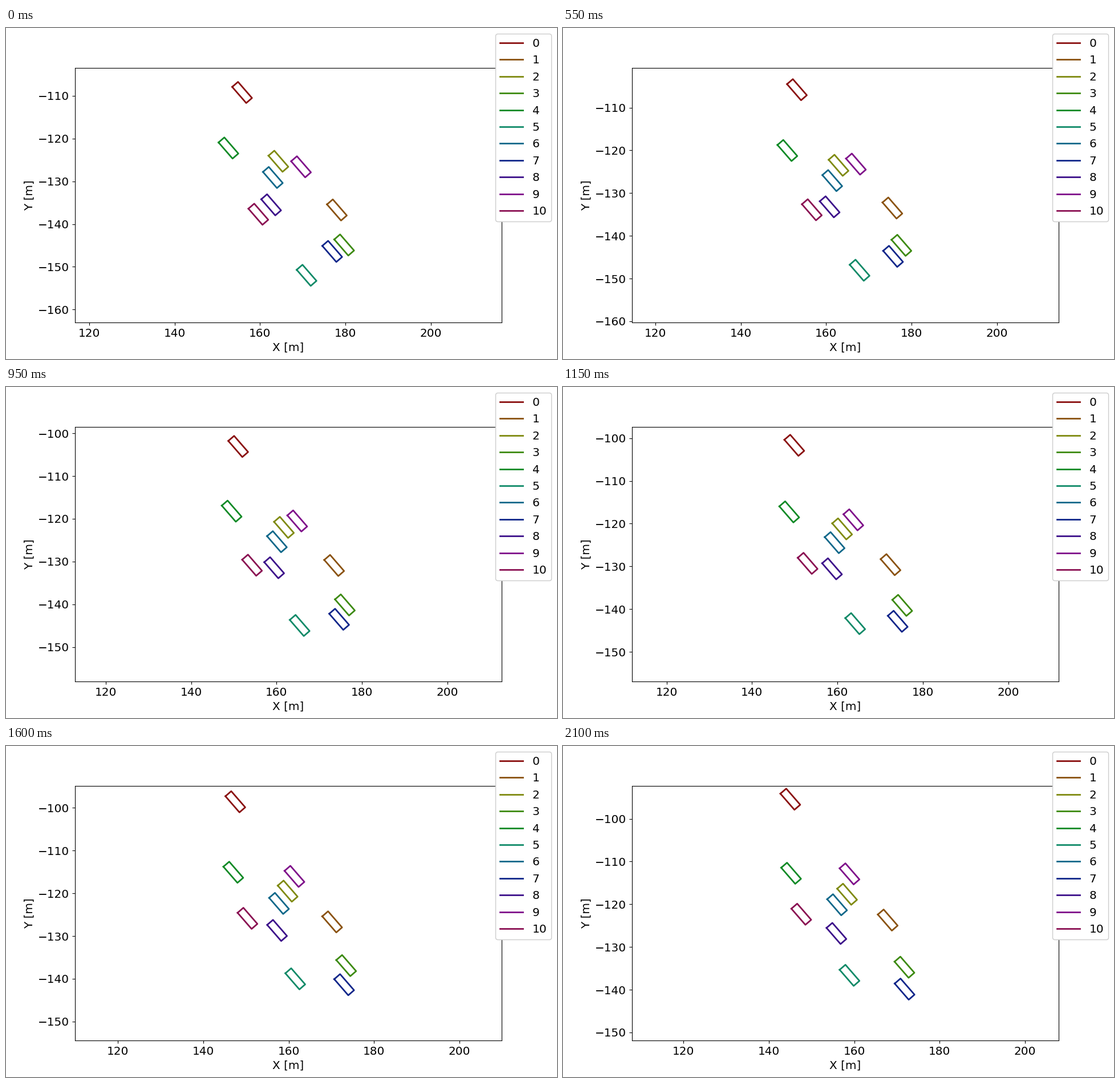
Recreate the animation shown at these times as a matplotlib script. Size 966x580 px, loop 2150 ms.

```python
import colorsys

import matplotlib.pyplot as plt
import numpy as np
from matplotlib.animation import FuncAnimation
from matplotlib.ticker import MultipleLocator

W, H, DPI = 966, 580, 100
FRAMES, INTERVAL = 43, 50
LENGTH, WIDTH = 5.0, 1.8
COURSE, HEADING = np.radians([128, 131])
HALF_X = 50

plt.rcParams.update({
    "font.family": "DejaVu Sans",
    "axes.labelsize": "x-large",
    "xtick.labelsize": "x-large",
    "ytick.labelsize": "x-large",
    "legend.fontsize": "x-large",
})

# Each car: start x, start y, distance driven, speed gain.
CARS = np.array([
    (155.8, -109.2, 17.5, 0.3),
    (178.0, -136.7, 16.5, 0.3),
    (164.3, -125.3, 9.7, 0.7),
    (179.7, -144.9, 12.9, -0.9),
    (152.6, -122.2, 12.0, 1.3),
    (170.9, -152.0, 19.5, -0.7),
    (163.0, -129.1, 11.4, 1.5),
    (176.9, -146.4, 8.3, 0.3),
    (162.6, -135.5, 11.0, -0.8),
    (169.6, -126.6, 17.4, 0.3),
    (159.6, -137.7, 19.5, 0.3),
])
START, DRIVEN, GAIN = CARS[:, :2], CARS[:, 2], CARS[:, 3]


def unit(angle):
    return np.array([np.cos(angle), np.sin(angle)])


# Closed outline, from the front left corner.
CORNERS = np.array([(1, 1), (1, -1), (-1, -1), (-1, 1), (1, 1)]) / 2
OUTLINE = CORNERS * (LENGTH, WIDTH) @ [unit(HEADING), unit(HEADING + np.pi / 2)]


def centers(s):
    """Car positions at s in 0..1, slightly faster around the middle."""
    p = s - 0.012 * np.sin(2 * np.pi * s)
    return START + np.outer(DRIVEN * p + GAIN * p * (p - 1), unit(COURSE))


fig, ax = plt.subplots(figsize=(W / DPI, H / DPI), dpi=DPI)
ax.set_xlabel("X [m]")
ax.set_ylabel("Y [m]")
ax.xaxis.set_major_locator(MultipleLocator(20))
ax.yaxis.set_major_locator(MultipleLocator(10))

box = ax.get_position()
HALF_Y = HALF_X * (box.height * H) / (box.width * W)

n = len(CARS)
lines = [
    ax.plot([], [], lw=2, color=colorsys.hls_to_rgb(i / n, 0.3, 0.8), label=str(i))[0]
    for i in range(n)
]
fig.legend(loc="upper right", framealpha=1, labelspacing=0.52)


def update(k):
    pos = centers(k / (FRAMES - 1))
    for line, c in zip(lines, pos):
        line.set_data(*(c + OUTLINE).T)
    x, y = pos.mean(axis=0)
    ax.set_xlim(x - HALF_X, x + HALF_X)
    ax.set_ylim(y - HALF_Y, y + HALF_Y)
    return lines


anim = FuncAnimation(fig, update, frames=FRAMES, interval=INTERVAL, repeat=True)
plt.show()
```
